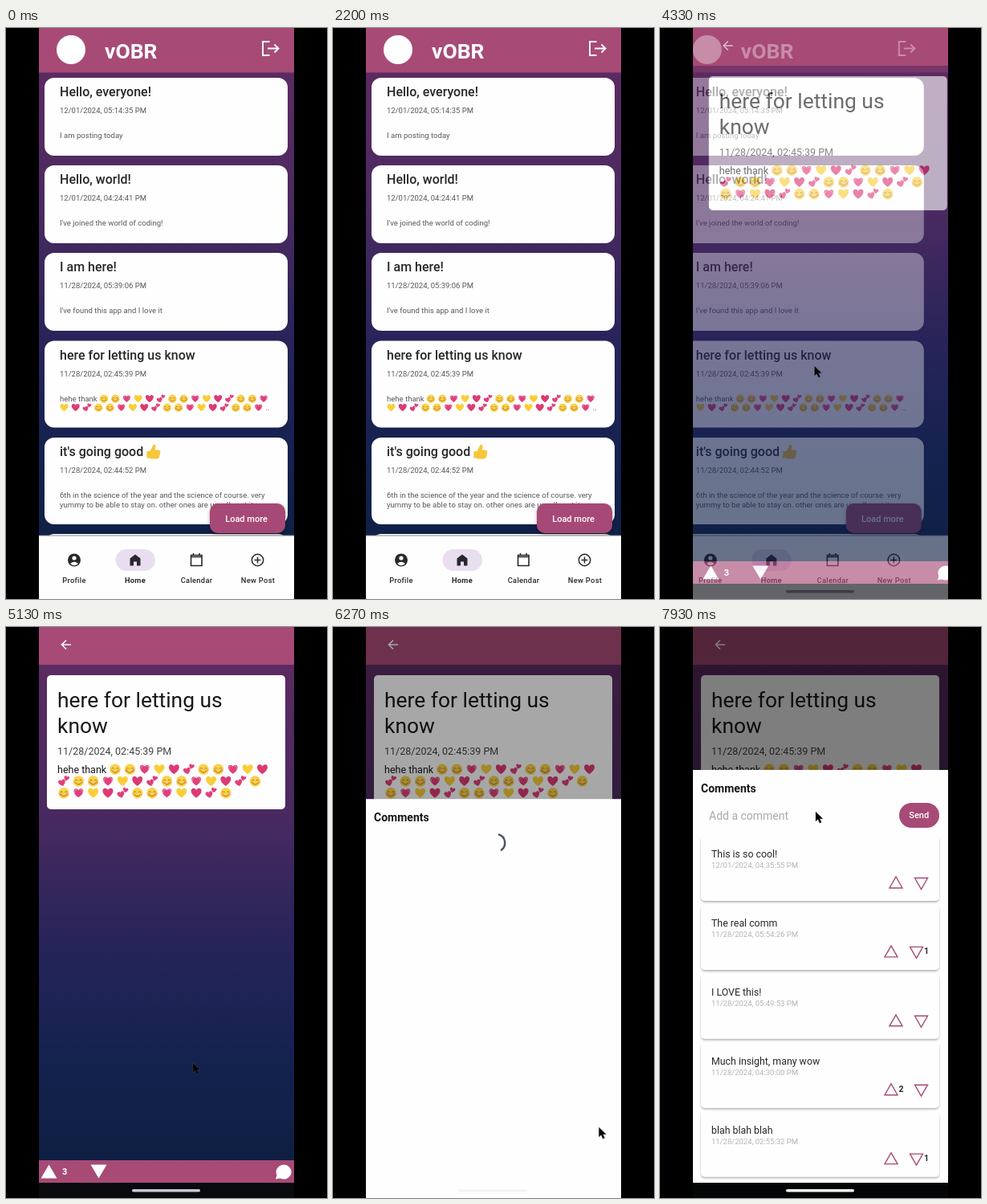
Write an HTML page that moves like this. It is 400 px wide and 711 px high and loops after 8 s.

```html
<!DOCTYPE html>
<html lang="en">
<head>
<meta charset="utf-8">
<title>Post feed</title>
<style>
  html, body { margin: 0; width: 100%; height: 100%; overflow: hidden; background: #000; }
  svg { display: block; width: 100vw; height: 100vh; font-family: Roboto, sans-serif; }
</style>
</head>
<body>
<svg id="stage" viewBox="0 0 400 711"></svg>
<script>
const PAPER = '#fefefe', ROSE = '#a74a76', INK = '#28282c', BODY = '#58585f', FAINT = '#b4b4b9';
const LOOP = 8000;

// ---------- drawing helpers ----------
const text = (x, y, size, str, fill = INK, weight = 400, extra = '') =>
  `<text x="${x}" y="${y}" font-size="${size}" font-weight="${weight}" fill="${fill}" ${extra}>${str}</text>`;
const centered = 'text-anchor="middle"';
const rect = (x, y, w, h, fill, r = 0, extra = '') =>
  `<rect x="${x}" y="${y}" width="${w}" height="${h}" rx="${r}" fill="${fill}" ${extra}/>`;
const line = (d, color, width = 2) =>
  `<path d="${d}" fill="none" stroke="${color}" stroke-width="${width}"/>`;
const triangle = (x, y, dir, w, h, attrs) =>
  `<path d="M${x - w / 2} ${y + dir * h / 2}h${w}l${-w / 2} ${-dir * h}z" ${attrs}/>`;

const EMOJI = ['smile', 'blush', 'beat', 'yellow', 'pink', 'two'];
const emojiRow = (x, y, step, scale, first, count) =>
  Array.from({ length: count }, (_, i) =>
    `<use href="#${EMOJI[(first + i) % 6]}" transform="translate(${x + i * step} ${y}) scale(${scale})"/>`).join('');

const HEART = 'M0 8.5C-13 0-10-8.5-5-8.5C-2.3-8.5-.6-7 0-5C.6-7 2.3-8.5 5-8.5C10-8.5 13 0 0 8.5Z';
const heart = (fill, move = '') => `<path d="${HEART}" fill="${fill}" transform="${move}"/>`;
const face = (cheek, r) => `<circle r="9.6" fill="#fad24a"/>
  <g fill="${cheek}"><circle cx="-6" cy="2" r="${r}"/><circle cx="6" cy="2" r="${r}"/></g>
  ${line('M-6-1q2-4 4 0M2-1q2-4 4 0M-5 3q5 5.5 10 0', '#8a6428', 1.3)}`;

const defs = `<defs>
  <clipPath id="phone"><rect x="41" width="318" height="711"/></clipPath>
  <linearGradient id="dusk" x2="0" y2="1">
    <stop stop-color="#602b62"/><stop offset=".32" stop-color="#4a2a60"/>
    <stop offset=".55" stop-color="#272459"/><stop offset=".75" stop-color="#14224f"/>
    <stop offset="1" stop-color="#0c1e3e"/>
  </linearGradient>
  <filter id="shade" x="-20%" y="-20%" width="140%" height="160%">
    <feDropShadow dx="0" dy="2" stdDeviation="2" flood-opacity=".35"/>
  </filter>
  <filter id="soft"><feDropShadow dx="0" dy="1.700" stdDeviation=".9" flood-opacity=".3"/></filter>
  <g id="smile">${face('#f8a850', 2)}</g>
  <g id="blush">${face('#f29660', 2.4)}</g>
  <g id="beat">${heart('#e0407c', 'scale(.92)')}
    ${line('M-7 1q-1-7 4-7M7 1q1-7-4-7', '#f49ab8', 1.4)}</g>
  <g id="yellow">${heart('#f8cf38')}</g>
  <g id="pink">${heart('#dc3a74')}</g>
  <g id="two">${heart('#e0407a', 'translate(-3 3) rotate(-14) scale(.68)')}
    ${heart('#e0407a', 'translate(5 -5) rotate(14) scale(.5)')}</g>
</defs>`;

// ---------- home feed ----------
function card(y, h, title, date, lines) {
  return rect(48, y, 303, h, PAPER, 12)
    + text(67, y + 23, 16, title, INK, 500)
    + text(67, y + 44, 9.5, date, BODY)
    + lines.map((s, i) => text(67, y + 75 + i * 11.5, 9.55, s, BODY)).join('');
}

const tab = (x, label, weight) =>
  text(x, 690.5, 9.3, label, INK, weight, centered + ' letter-spacing=".3"');

const home = `
  ${rect(41, 0, 360, 711, 'url(#dusk)')}
  ${card(62, 97, 'Hello, everyone!', '12/01/2024, 05:14:35 PM', ['I am posting today'])}
  ${card(171, 97, 'Hello, world!', '12/01/2024, 04:24:41 PM', ["I've joined the world of coding!"])}
  ${card(280, 97, 'I am here!', '11/28/2024, 05:39:06 PM', ["I've found this app and I love it"])}
  ${card(389.5, 108, 'here for letting us know', '11/28/2024, 02:45:39 PM', ['hehe thank'])}
  ${emojiRow(122, 461.7, 14.22, 0.54, 0, 15)}
  ${emojiRow(72.5, 472.7, 14.25, 0.54, 3, 18)}
  ${text(323.5, 476, 9.5, '..', BODY)}
  ${card(510, 108, "it's going good", '11/28/2024, 02:44:52 PM', [
    '6th in the science of the year and the science of course. very',
    'yummy to be able to stay on. other ones are usually not it'])}
  <path d="M175.5 527h4l4-8q3-1 3 3l-.7 3.500h5q2 .5 1.500 3l-1.500 6q-.7 2-3 2h-7l-2-1h-3.500z" fill="#f8c63a"/>
  ${rect(48, 630, 303, 60, PAPER, 12)}
  ${rect(254, 592, 94, 37, ROSE, 10, 'filter="url(#shade)"')}
  ${text(299.5, 614.5, 11, 'Load more', PAPER, 500, centered)}
  ${rect(41, 0, 360, 55.5, ROSE)}
  <circle cx="81" cy="27" r="18" fill="${PAPER}"/>
  ${text(123, 37.5, 26.5, 'vOBR', PAPER, 700)}
  ${line('M328.500 17H320V34H328.500M326 25.500H339M334.500 20.500l5 5l-5 5', PAPER)}
  ${rect(41, 632, 360, 79, PAPER)}
  ${rect(41, 631.5, 360, 1, '#85858c')}
  ${rect(136.5, 649, 49.5, 27, '#e8def0', 13.5)}
  <circle cx="85" cy="662.500" r="8" fill="${INK}"/>
  <g fill="${PAPER}"><circle cx="85" cy="660" r="2.600"/><path d="M80 667q5-4.500 10 0q-5 4.500-10 0z"/></g>
  <path d="M154.500 669.500v-9l6.500-5l6.500 5v9h-4.500v-5h-4v5z" fill="${INK}"/>
  ${line('M230.500 656.500h13.500v13h-13.500zM230.500 658.500h13.500M233.500 654v3M241 654v3', INK, 1.6)}
  <circle cx="313.500" cy="662.500" r="7.200" fill="none" stroke="${INK}" stroke-width="1.500"/>
  ${line('M309.500 662.500h8M313.500 658.500v8', INK, 1.5)}
  ${tab(85, 'Profile', 500)}${tab(161, 'Home', 700)}${tab(237.5, 'Calendar', 500)}${tab(314, 'New Post', 500)}`;

// ---------- single post ----------
const post = `
  ${rect(0, 0, 400, 711, 'url(#dusk)')}
  ${rect(0, 692, 400, 19, '#090a0e')}
  ${rect(0, 0, 400, 47, ROSE)}
  ${line('M81 22H70M75 16.500L69.500 22L75 27.500', PAPER, 1.6)}
  ${rect(51, 60, 297, 167, PAPER, 5)}
  ${text(64, 100, 26.4, 'here for letting us', '#18181b')}
  ${text(64, 131.5, 26.4, 'know', '#18181b')}
  ${text(64, 158.5, 12.5, '11/28/2024, 02:45:39 PM', '#404046')}
  ${text(64, 181.5, 12.5, 'hehe thank', '#18181b')}
  ${emojiRow(136, 177.3, 18.35, 0.7, 0, 11)}
  ${emojiRow(72, 192, 18.35, 0.7, 5, 14)}
  ${emojiRow(72, 206.7, 18.35, 0.7, 1, 12)}
  ${rect(0, 664, 400, 28, ROSE)}
  ${triangle(53.5, 678, 1, 20, 17, `fill="${PAPER}"`)}
  ${text(70, 682, 11, '3', PAPER, 700)}
  ${triangle(115.5, 678, -1, 20, 17, `fill="${PAPER}"`)}
  <path d="M336 687.500l1.500-5a9.500 9 0 1 1 4 4z" fill="${PAPER}"/>`;

// ---------- comment sheet ----------
function comment([title, date, up, down], i) {
  const y = 260 + i * 85.9;
  const outline = `fill="none" stroke="${ROSE}" stroke-width="1.400"`;
  const upX = up || down ? 288 : 294, downX = down ? 319.5 : 325.5;
  return rect(51, y, 297, 81, PAPER, 5, 'filter="url(#soft)"')
    + text(64, y + 27, 12.35, title)
    + text(64, y + 40, 9.5, date, FAINT)
    + triangle(upX, y + 58, 1, 16, 14, outline)
    + triangle(downX, y + 59.5, -1, 16, 14, outline)
    + (up ? text(297.5, y + 61.5, 10.5, up, INK, 700) : '')
    + (down ? text(329, y + 61.5, 10.5, down, INK, 700) : '');
}

const sheet = `
  ${rect(41, 178, 318, 514, PAPER)}
  ${text(51, 205.5, 14, 'Comments', '#18181b', 700)}
  <path id="spinner" d="M206 222a11 11 0 0 1 3 20" fill="none" stroke="#50566a" stroke-width="2.500"/>
  <g id="comments">
    ${text(61, 240, 14, 'Add a comment', '#a8a8ae')}
    ${rect(298, 219, 50, 31, ROSE, 15.5)}
    ${text(322.7, 238.3, 11, 'Send', PAPER, 500, centered)}
    ${[['This is so cool!', '12/01/2024, 04:35:55 PM'],
       ['The real comm', '11/28/2024, 05:54:26 PM', '', '1'],
       ['I LOVE this!', '11/28/2024, 05:49:53 PM'],
       ['Much insight, many wow', '11/28/2024, 04:30:00 PM', '2'],
       ['blah blah blah', '11/28/2024, 02:55:32 PM', '', '1']].map(comment).join('')}
  </g>`;

document.getElementById('stage').innerHTML = `${defs}
  <g clip-path="url(#phone)">
    <g id="home">${home}</g>
    <g id="post">${post}</g>
    <rect id="scrim" x="41" width="318" height="711"/>
    <g id="sheet">${sheet}</g>
    <rect id="pill" x="157" y="700" width="85" height="3.500" rx="1.700"/>
    <path id="cursor" d="M0 0v12l2.800-2.500l2.200 4.700l2.200-1l-2.200-4.500h4z" fill="#000" stroke="#58585f" stroke-width=".4"/>
  </g>`;

// ---------- motion ----------
const clamp = v => Math.min(1, Math.max(0, v));
const span = (t, start, length) => clamp((t - start) / length);
const smooth = v => v * v * (3 - 2 * v);
const mix = (a, b, k) => a + (b - a) * k;

// y at a given x on a cubic Bezier with monotonic x
function bezier(x, [x0, y0], [x1, y1], [x2, y2], [x3, y3]) {
  const at = (u, a, b, c, d) => {
    const v = 1 - u;
    return a * v ** 3 + 3 * b * u * v * v + 3 * c * u * u * v + d * u ** 3;
  };
  let lo = 0, hi = 1;
  for (let i = 0; i < 24; i++) {
    const mid = (lo + hi) / 2;
    if (at(mid, x0, x1, x2, x3) < x) lo = mid; else hi = mid;
  }
  return at(lo, y0, y1, y2, y3);
}
const screenEase = x => x < 1 / 6
  ? bezier(x, [0, 0], [0.05, 0], [0.1333, 0.06], [1 / 6, 0.4])
  : bezier(x, [1 / 6, 0.4], [0.2083, 0.82], [0.25, 1], [1, 1]);
const sheetEase = x => bezier(x, [0, 0], [0.4, 0], [0.2, 1], [1, 1]);

// time, x, y
const CURSOR = [
  [3200, 380, 520], [4000, 192.5, 421], [4400, 192.5, 421], [5130, 233, 543],
  [5230, 236, 548], [5800, 349, 673], [6130, 349, 673], [6670, 244.5, 377],
  [6800, 244.5, 377], [7500, 194, 230], [LOOP, 194, 230]];

function cursorAt(t) {
  const i = Math.max(1, CURSOR.findIndex(k => k[0] >= t));
  const [t0, x0, y0] = CURSOR[i - 1], [t1, x1, y1] = CURSOR[i];
  const k = smooth(span(t, t0, t1 - t0));
  return [mix(x0, x1, k), mix(y0, y1, k)];
}

const OPEN_POST = 4234, OPEN_SHEET = 5996, LOADED = 6350;
const part = id => document.getElementById(id);
const [homeEl, postEl, scrimEl, sheetEl, spinnerEl, commentsEl, pillEl, cursorEl] =
  ['home', 'post', 'scrim', 'sheet', 'spinner', 'comments', 'pill', 'cursor'].map(part);
const move = (el, x, y) => el.setAttribute('transform', `translate(${x} ${y})`);
const fade = (el, v) => el.setAttribute('opacity', v);

function draw(t) {
  const slide = 32 * screenEase(span(t, OPEN_POST, 450));
  move(homeEl, -slide, 0);
  move(postEl, 32 - slide, 0);
  fade(postEl, span(t, OPEN_POST + 45, 83));

  move(sheetEl, 0, 533 * (1 - sheetEase(span(t, OPEN_SHEET, 400))));
  fade(sheetEl, span(t, OPEN_SHEET, 165));
  fade(scrimEl, 0.5 * span(t, OPEN_SHEET, 400));
  fade(spinnerEl, t < LOADED ? 1 : 0);
  fade(commentsEl, t < LOADED ? 0 : 1);

  fade(pillEl, t < OPEN_POST ? 0 : 1);
  pillEl.setAttribute('fill', t < 4450 ? '#3c3c48' : t < OPEN_SHEET ? '#c8c8ce' : '#f4f4f4');

  move(cursorEl, ...cursorAt(t));
  fade(cursorEl, t < CURSOR[0][0] ? 0 : 1);
}

const begin = performance.now();
function tick() {
  draw((performance.now() - begin) % LOOP);
  requestAnimationFrame(tick);
}
tick();
</script>
</body>
</html>
```
